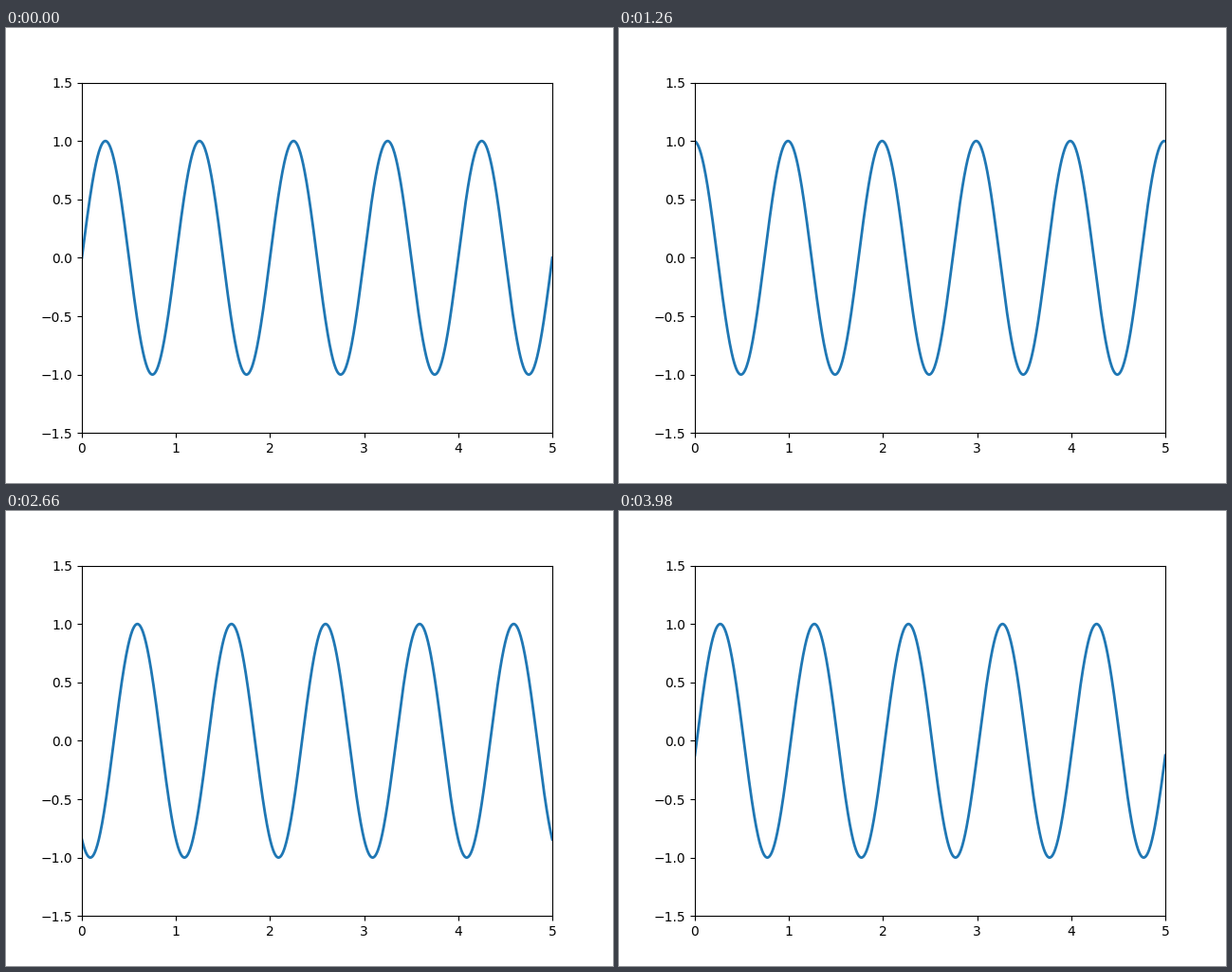
Write a matplotlib script that moves like this. It is 640 by 480 pixels and loops after 4 s.

```python
import numpy as np
import matplotlib.pyplot as plt
from matplotlib.animation import FuncAnimation

FRAMES = 200
INTERVAL = 20   # ms
STEP = 0.02     # phase advance per frame, in periods

plt.rcParams["font.family"] = "DejaVu Sans"

fig = plt.figure(figsize=(6.4, 4.8), dpi=100)
ax = fig.add_subplot(xlim=(0, 5), ylim=(-1.5, 1.5))
x = np.linspace(0, 5, 1000)
line, = ax.plot(x, np.sin(2 * np.pi * x), color="#1f77b4", lw=2)


def update(i):
    line.set_ydata(np.sin(2 * np.pi * (x + STEP * i)))
    return line,


anim = FuncAnimation(fig, update, frames=FRAMES, interval=INTERVAL,
                     repeat=True, repeat_delay=0, blit=True)
plt.show()
```
